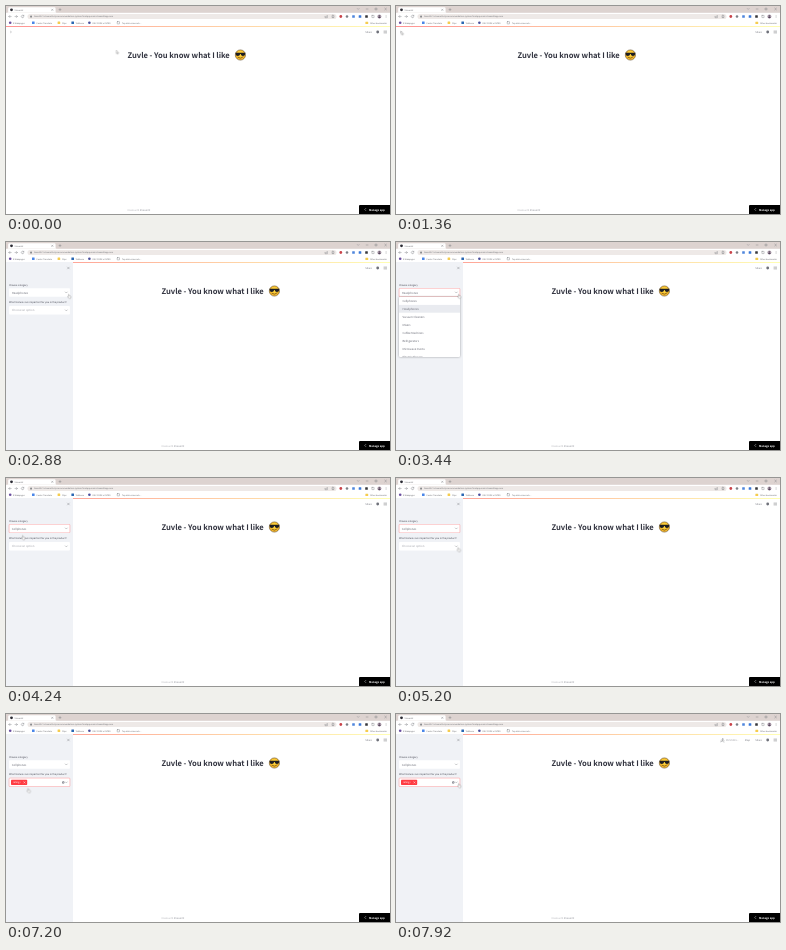
Write an HTML page that moves like this. It is 384 px wide and 208 px high and loops after 8000 ms.

```html
<!DOCTYPE html>
<html lang="en">
<head>
<meta charset="utf-8">
<title>Review recommender</title>
<style>
  html, body { margin: 0; width: 100%; height: 100%; overflow: hidden; background: #fff; }
  svg { display: block; width: 100%; height: 100%; }
  text {
    font: 2.43px "Noto Sans CJK JP", "Noto Sans CJK SC", "Noto Sans", sans-serif;
    fill: #4a4c57; white-space: pre; text-rendering: geometricPrecision;
  }
  .chrome text { font: 2.05px "Open Sans", sans-serif; fill: #5c5d62; }
  .chrome .url { font-size: 2.1px; fill: #66676c; }
  .line { fill: none; stroke: #74777c; stroke-width: .4; stroke-linecap: round; stroke-linejoin: round; }
  .title { font-size: 7.64px; font-weight: 700; letter-spacing: -.005em; fill: #31333f; }
  .button { font-size: 2.65px; font-weight: 700; fill: #fff; }
  .value { font-size: 2.78px; fill: #666873; }
  .hint { font-size: 2.78px; fill: #a3a4ab; }
  .foot { fill: #b5b6bb; }
  .box { fill: #fff; }
  .focus { fill: none; stroke: #ff4b4b; stroke-width: .3; }
  .panel { fill: #fff; filter: drop-shadow(0 .7px 1.1px rgba(0, 0, 0, .35)); }
  .hover { fill: #e9ebf0; }
  .white { fill: #fff; stroke: #fff; }

  /* one percent is 80 ms */
  .side { animation: side 8s linear infinite; }
  .main { animation: main 8s linear infinite; }
  @keyframes side {
    0%, 19% { transform: translateX(-68px); animation-timing-function: ease-out; }
    22%, 100% { transform: none; }
  }
  @keyframes main {
    0%, 19% { transform: none; animation-timing-function: ease-out; }
    22%, 100% { transform: translateX(34px); }
  }

  .step { animation: 8s step-end infinite; }
  .closed { animation-name: closed; }
  .open1 { animation-name: open1; }
  .focus1 { animation-name: focus1; }
  .before { animation-name: before; }
  .after { animation-name: after; }
  .hover1 { animation-name: hover1; }
  .open2 { animation-name: open2; }
  .focus2 { animation-name: focus2; }
  .hover2 { animation-name: hover2; }
  .empty { animation-name: empty; }
  .tag { animation-name: tag; }
  .running { animation-name: running; }
  .arrow { animation-name: arrow; }
  .hand { animation-name: hand; }
  @keyframes closed { 0% { opacity: 1 } 19% { opacity: 0 } }
  @keyframes open1 { 0% { opacity: 0 } 38% { opacity: 1 } 53% { opacity: 0 } }
  @keyframes focus1 { 0% { opacity: 0 } 38% { opacity: 1 } 68% { opacity: 0 } }
  @keyframes before { 0% { opacity: 1 } 53% { opacity: 0 } }
  @keyframes after { 0% { opacity: 0 } 53% { opacity: 1 } }
  @keyframes hover1 { 0% { transform: translateY(8px) } 48% { transform: none } }
  @keyframes open2 { 0% { opacity: 0 } 68% { opacity: 1 } 88% { opacity: 0 } }
  @keyframes focus2 { 0% { opacity: 0 } 68% { opacity: 1 } }
  @keyframes hover2 { 0% { transform: none } 76% { transform: translateY(8px) } 84% { transform: none } }
  @keyframes empty { 0% { opacity: 1 } 88% { opacity: 0 } }
  @keyframes tag { 0% { opacity: 0 } 88% { opacity: 1 } }
  @keyframes running { 0% { opacity: 0 } 93% { opacity: 1 } }
  @keyframes arrow { 0% { opacity: 1 } 35% { opacity: 0 } }
  @keyframes hand { 0% { opacity: 0 } 35% { opacity: 1 } }

  .pointer { animation: pointer 8s ease-in-out infinite; }
  @keyframes pointer {
    0%, 1% { transform: translate(110.3px, 44.2px); }
    13%, 27% { transform: translate(5.2px, 25.2px); }
    36%, 43% { transform: translate(62px, 52.2px); }
    50%, 54% { transform: translate(16px, 57.5px); }
    63%, 69% { transform: translate(61.5px, 69.5px); }
    78%, 82% { transform: translate(19px, 82.4px); }
    86%, 88% { transform: translate(13px, 75.5px); }
    95%, 100% { transform: translate(62px, 69.5px); }
  }
</style>
</head>
<body>
<svg viewBox="0 0 384 208" preserveAspectRatio="none">
  <defs>
    <linearGradient id="glow">
      <stop offset="0" stop-color="#ff4b4b"/>
      <stop offset="1" stop-color="#fffd80"/>
    </linearGradient>
    <radialGradient id="face" cy=".4">
      <stop offset=".3" stop-color="#ffd43b"/>
      <stop offset="1" stop-color="#f5b52a"/>
    </radialGradient>
    <clipPath id="cut1"><rect x="3" y="54.9" width="61" height="60"/></clipPath>
    <clipPath id="cut2"><rect x="3" y="72.4" width="61" height="60"/></clipPath>
    <path id="down" class="line" d="M-1-.5 0 .5 1-.5"/>
  </defs>
  <rect width="384" height="208" fill="#fff"/>

  <!-- page -->
  <rect y="20" width="384" height="1" fill="url(#glow)" opacity=".6"/>
  <path class="line step closed" d="M4.3 24.9 5.4 26 4.3 27.1"/>
  <g class="main">
    <text class="title" x="121.5" y="51.9">Zuvle - You know what I like</text>
    <g transform="translate(234.4 49)">
      <circle r="5.1" fill="url(#face)" stroke="#4a3510" stroke-width=".5"/>
      <path d="M-5-2.3H5L4.4.3Q2.4 1.8.8.2L.3-1H-.3L-.8.2Q-2.4 1.8-4.4.3Z" fill="#1d1d22"/>
      <path d="M-2.4 2.4Q.2 4.3 2.7 2" fill="none" stroke="#4a3510" stroke-width=".6" stroke-linecap="round"/>
    </g>
    <text class="foot" x="121.6" y="205">Made with <tspan fill="#8b8d95">Streamlit</tspan></text>
  </g>

  <g class="step running">
    <circle cx="326.8" cy="24.8" r=".6" fill="#777982"/>
    <path class="line" d="M325 26.2 327 25.7 328.3 26.7M326.8 26 326.2 27.3 324.6 27.8M326.5 27 328 28.2"/>
    <text x="330" y="27" fill-opacity=".5">RUNNING...</text>
    <text x="348.7" y="27" fill-opacity=".75">Stop</text>
  </g>
  <text x="359.3" y="27" fill-opacity=".75">Share</text>
  <circle cx="371.7" cy="26" r="1.4" fill="#6f717a"/>
  <path class="line" d="M378 25H380.6M378 26H380.6M378 27H380.6"/>

  <path d="M353 208V200Q353 199 354 199H384V208Z"/>
  <path class="line white" style="fill:none" d="M359.8 202.4 358.7 203.5 359.8 204.6"/>
  <text class="button" x="363" y="204.5">Manage app</text>

  <!-- sidebar -->
  <g class="side">
    <rect y="20" width="67" height="188" fill="#f0f2f6"/>
    <path class="line" d="M61.5 25.1 63.3 26.9M63.3 25.1 61.5 26.9"/>

    <text x="3" y="43.9">Choose category</text>
    <rect class="box" x="3.1" y="46.3" width="60.8" height="8.5" rx=".8"/>
    <rect class="focus step focus1" x="3.1" y="46.3" width="60.8" height="8.5" rx=".8"/>
    <text class="value step before" x="5.8" y="51.6">Headphones</text>
    <text class="value step after" x="5.8" y="51.6">Cellphones</text>
    <use href="#down" x="60.3" y="50.5"/>

    <text x="3" y="61.2">What features are important for you in the product?</text>
    <rect class="box" x="3.1" y="64.1" width="60.8" height="8.5" rx=".8"/>
    <rect class="focus step focus2" x="3.1" y="64.1" width="60.8" height="8.5" rx=".8"/>
    <text class="hint step empty" x="5.8" y="69.4">Choose an option</text>
    <g class="step tag">
      <rect x="5" y="65.8" width="16.2" height="5.2" rx=".7" fill="#ff3b42"/>
      <text x="6.8" y="69.3" style="fill:#fff">ratings</text>
      <path class="line white" d="M17.7 67.7 19.1 69.1M19.1 67.7 17.7 69.1"/>
      <circle cx="57.2" cy="68.4" r="1.2" fill="#6c6e78"/>
      <path class="line white" d="M56.7 67.9 57.7 68.9M57.7 67.9 56.7 68.9"/>
    </g>
    <use href="#down" x="60.3" y="68.4"/>

    <g class="step open1">
      <rect class="panel" x="3" y="54.9" width="61" height="60" rx=".8"/>
      <g clip-path="url(#cut1)">
        <rect class="hover step hover1" x="3" y="54.9" width="61" height="7.8"/>
        <g id="kinds"></g>
      </g>
    </g>
    <g class="step open2">
      <rect class="panel" x="3" y="72.4" width="61" height="60" rx=".8"/>
      <g clip-path="url(#cut2)">
        <rect class="hover step hover2" x="3" y="72.4" width="61" height="7.8"/>
        <g id="traits"></g>
        <rect x="62.8" y="72.4" width="1.2" height="44.8" rx=".6" fill="#a9abb2"/>
      </g>
    </g>
  </g>

  <!-- browser -->
  <g class="chrome">
    <rect width="384" height="20" fill="#fff"/>
    <rect width="384" height="6.8" fill="#ddd3d0"/>
    <path d="M1 6.8Q2.2 6.6 2.2 5.4V2.6Q2.2 1.2 3.6 1.2H48.2Q49.6 1.2 49.6 2.6V5.4Q49.6 6.6 50.8 6.8Z" fill="#fff"/>
    <circle cx="5.5" cy="3.8" r="1.4" fill="#2c2c34"/>
    <text x="8.6" y="4.5">Streamlit</text>
    <path class="line" d="M45.6 3.1 47 4.5M47 3.1 45.6 4.5M53 3.6H55M54 2.6V4.6"/>
    <path class="line" d="M351.4 2.6 352.2 3.4 353 2.6M360.2 3H362M369.4 2.2H371V3.8H369.4ZM378.8 2.2 380.4 3.8M380.4 2.2 378.8 3.8"/>

    <path class="line" d="M5.2 10.5H2.8L3.9 9.4M2.8 10.5 3.9 11.6M9 10.5H11.4L10.3 9.4M11.4 10.5 10.3 11.6M17.6 9.7A1.3 1.3 0 1 0 17.8 11M17.8 9.2V10H17"/>
    <rect x="21.5" y="8" width="309" height="5.1" rx="2.55" fill="#eee9e7"/>
    <rect x="24.3" y="10.2" width="1.5" height="1.2" fill="#5f6368"/>
    <path class="line" d="M24.6 10.2V9.7Q25.05 9 25.5 9.7V10.2"/>
    <text class="url" x="28" y="11.3">tkam2021-streamlit-nlp-recommendation-system-finalapp-main.streamlitapp.com</text>
    <path class="line" d="M319 10.3V11.7H321.4V10.6M319.8 10.6Q320 9.6 321.6 9.6"/>
    <path class="line" d="M327 9.1 327.4 10.1 328.4 10.2 327.6 10.9 327.9 11.9 327 11.3 326.1 11.9 326.4 10.9 325.6 10.2 326.6 10.1Z"/>
    <circle cx="334.8" cy="10.5" r="1.4" fill="#c9434a"/>
    <circle cx="341" cy="10.5" r="1.3" fill="#7d8088"/>
    <rect x="346.2" y="9.2" width="2.6" height="2.6" rx=".3" fill="#4f86dd"/>
    <rect x="352.7" y="9.2" width="2.6" height="2.6" rx=".3" fill="#3b78d8"/>
    <rect x="359.2" y="9.2" width="2.6" height="2.6" rx=".4" fill="#37383d"/>
    <rect class="line" x="365.9" y="9.4" width="2.2" height="2.2" rx=".2"/>
    <circle cx="373.4" cy="10.5" r="2" fill="#a99aa8"/>
    <path d="M372 11.6Q373.4 10.1 374.8 11.6Q373.4 12.9 372 11.6Z" fill="#54435a"/>
    <circle cx="373.4" cy="9.9" r=".7" fill="#54435a"/>
    <path d="M379.8 9.2h.5v.5h-.5zm0 1.1h.5v.5h-.5zm0 1.1h.5v.5h-.5z" fill="#5f6368"/>

    <circle cx="4.2" cy="16.8" r="1.3" fill="#6b4fa0"/>
    <text x="7" y="17.5">E-Webpages</text>
    <rect x="26" y="15.5" width="2.6" height="2.6" rx=".3" fill="#4a86e8"/>
    <text x="30.6" y="17.5">Fenlor Translate</text>
    <rect x="51.6" y="15.6" width="2.6" height="2.4" rx=".3" fill="#f5cc4e"/>
    <text x="56" y="17.5">Clips</text>
    <rect x="65.4" y="15.5" width="2.6" height="2.6" rx=".3" fill="#2a67b2"/>
    <text x="69.6" y="17.5">Talkbase</text>
    <circle cx="83.4" cy="16.8" r="1.3" fill="#4b4f9c"/>
    <text x="86.6" y="17.5">DEV CODE x INTRO</text>
    <rect class="line" x="111.2" y="15.6" width="2.3" height="2.3" rx=".3"/>
    <text x="116" y="17.5">Top data science b...</text>
    <rect x="359.4" y="15.7" width="2.8" height="2.3" rx=".3" fill="#f5cc4e"/>
    <text x="364" y="17.5">Other bookmarks</text>
  </g>

  <g class="pointer">
    <path class="step arrow" d="M0 0V3.4L.8 2.7 1.3 3.9 1.9 3.6 1.4 2.5H2.4Z" fill="#fff" stroke="#444" stroke-width=".25"/>
    <path class="step hand" d="M.4.3Q.8-.2 1.1.3V1.6L2.6 1.9Q3.1 2 3 2.7L2.7 4.2H.8L-.4 2.5Q-.4 1.9.4 2.3Z" fill="#fff" stroke="#444" stroke-width=".25"/>
  </g>
</svg>
<script>
  const fill = (id, top, names) => {
    const group = document.getElementById(id);
    names.forEach((name, i) => {
      const row = document.createElementNS(group.namespaceURI, "text");
      row.setAttribute("class", "value");
      row.setAttribute("x", 6.4);
      row.setAttribute("y", top + 8 * i);
      row.textContent = name;
      group.append(row);
    });
  };
  fill("kinds", 59.8, ["Cellphones", "Headphones", "Vacuum Cleaners", "Mixers",
    "Coffee Machines", "Refrigerators", "Microwave Ovens", "Electric Shavers"]);
  fill("traits", 77.2, ["ratings", "others", "speed", "price", "display", "storage", "design", "size"]);
</script>
</body>
</html>
```
